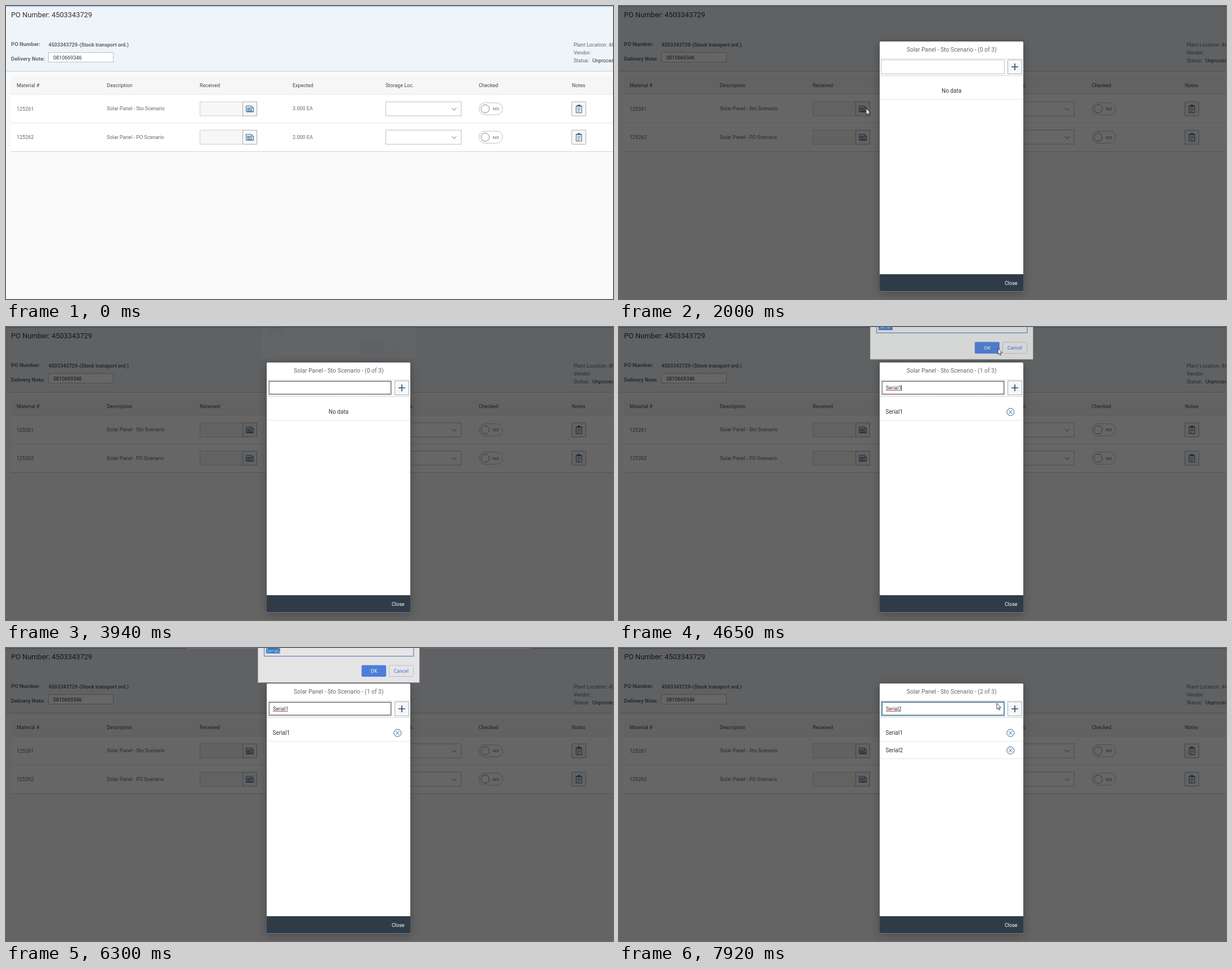
Recreate the animation shown at these times as an HTML page. Size 1078x520 px, loop 8 s.

```html
<!DOCTYPE html>
<html lang="en">
<head>
<meta charset="utf-8">
<title>Goods receipt</title>
<style>
  html, body { margin: 0; width: 100%; height: 100%; overflow: hidden; background: #fafafa; }
  svg { display: block; font: 9px Roboto, sans-serif; fill: #666; }
  .dark { fill: #333; }
  .bold { font-weight: 700; font-size: 9.5px; }
  .field { fill: #fff; stroke: #bfbfbf; }
  .off { fill: #f7f7f7; stroke: #cfcfcf; }
  .button { fill: #f7f7f7; stroke: #ababab; }
  .icon { fill: none; stroke: #346187; }
  .line { fill: none; stroke: #e5e5e5; }
  .pressed .button { fill: #427cac; stroke: #2a5f8c; }
  .pressed .icon { stroke: #fff; }
  .big { font-size: 10px; }
  #prompt text { font: 8.3px "Open Sans", sans-serif; }
</style>
</head>
<body>
<svg width="1078" height="520" viewBox="0 0 1078 520">
  <defs>
    <filter id="shadow" x="-30%" y="-20%" width="160%" height="140%">
      <feDropShadow dx="0" dy="3" stdDeviation="9" flood-opacity=".28"/>
    </filter>
  </defs>

  <rect width="1078" height="520" fill="#fafafa"/>
  <rect width="1078" height="115" fill="#eff4f9"/>
  <rect width="1078" height="1.5" fill="#a9cbec"/>
  <rect y="115" width="1078" height="1" fill="#cfd6dc"/>
  <rect y="116" width="1078" height="1" fill="#eceff1"/>
  <text class="dark" x="9" y="20" font-size="12.8">PO Number: 4503343729</text>
  <text class="bold" x="9" y="71.3">PO Number:</text>
  <text x="75.5" y="72.3" font-weight="700">4503343729-(Stock transport ord.)</text>
  <text class="bold" x="9" y="97.3">Delivery Note:</text>
  <rect class="field" x="75.5" y="82.5" width="115" height="17"/>
  <text class="dark" x="84" y="94.5">0810669346</text>
  <text x="1008" y="72">Plant Location: 46</text>
  <text x="1008" y="86">Vendor:</text>
  <text x="1008" y="99.5">Status:</text>
  <text class="dark" x="1041.5" y="100">Unprocessed</text>

  <rect x="9" y="126" width="1069" height="31" fill="#f6f6f6"/>
  <g id="headings" fill="#484848"></g>
  <g id="rows"></g>
  <path class="line" d="M9 156.5H1078"/>
  <path class="line" d="M9 207.5H1078"/>
  <path d="M9 258.5H1078" stroke="#d2d2d2"/>

  <g id="modal">
    <rect width="1078" height="520" opacity=".6" fill="#000"/>
    <rect x="463" y="63" width="255" height="443.5" rx="2" fill="#fff" filter="url(#shadow)"/>
    <path d="M463 476H718V504.5a2 2 0 0 1-2 2H465a2 2 0 0 1-2-2Z" fill="#2f3c48"/>
    <text x="685" y="495" fill="#fff">Close</text>
    <text id="title" x="590.7" y="81" font-size="10.35" text-anchor="middle"></text>
    <path class="line" d="M463 93.5H718M463 165.5H718"/>
    <path d="M463 123.5H718" stroke="#d5d5d5"/>
    <rect class="field" x="465.5" y="95.5" width="219" height="25"/>
    <g id="focus" fill="none">
      <rect x="467.5" y="96.5" width="216" height="22.5" stroke="#909090"/>
      <rect x="467.5" y="96.5" width="216" height="22.5" stroke="#333" stroke-dasharray="1"/>
    </g>
    <rect id="glow" x="465.8" y="95.3" width="218.6" height="25" fill="none" stroke="#6ea5d2" stroke-width="1.6"/>
    <g id="entry">
      <text id="entryText" class="dark" x="474" y="111"></text>
      <path d="M474 112.5H501" stroke="#c43c3c" stroke-width=".9"/>
    </g>
    <rect id="caret" y="103" width="1" height="10" fill="#222"/>
    <rect class="button" x="690.5" y="95.5" width="25" height="25"/>
    <path d="M697 108H709M703 102V114" stroke="#2d4f6e" stroke-width="1.7"/>
    <text id="empty" class="dark big" x="573" y="153.5">No data</text>
    <g id="list"></g>
  </g>

  <rect id="edge" width="612" height="1.4" fill="#d5d5d5"/>

  <g id="prompt">
    <rect x="446" y="-60" width="289.5" height="122.3" fill="#fff" stroke="#888" stroke-width=".7"/>
    <rect x="457.5" y="-10" width="267.5" height="25" fill="#fff" stroke="#7c9bd3" stroke-width="1.5"/>
    <rect x="461" y="-1" width="25" height="11" fill="#2374cf"/>
    <text id="promptText" x="461.5" y="8" fill="#fff"></text>
    <rect x="631.8" y="31" width="44" height="20.7" rx="2" fill="#4a84f0"/>
    <text x="653.8" y="44.5" fill="#fff" text-anchor="middle" style="font-weight:600">OK</text>
    <rect x="681.2" y="31.5" width="43.4" height="20" rx="2" fill="#fff" stroke="#ccd0d6"/>
    <text x="702.9" y="44.5" fill="#4a84f0" text-anchor="middle" style="font-weight:600">Cancel</text>
  </g>

  <path id="cursor" d="M0 0V10.6L2.4 8.4 4 12 5.6 11.3 4.1 7.8H7.3Z" fill="#fff" stroke="#111" stroke-width=".8"/>
</svg>

<script>
const LOOP = 8000;
const $ = id => document.getElementById(id);

$('headings').innerHTML = [
  [19, 'Material #'], [179, 'Description'], [344, 'Received'], [509, 'Expected'],
  [674, 'Storage Loc.'], [839.5, 'Checked'], [1005, 'Notes'],
].map(([x, label]) => `<text x="${x}" y="144">${label}</text>`).join('');

// Coordinates inside a row are relative to its vertical centre.
const tableRow = (number, name, amount, y) => `
  <g transform="translate(0 ${y})">
    <rect class="back" x="9" y="-25.5" width="1069" height="50.5" fill="#fff"/>
    <text x="19" y="3.5">${number}</text>
    <text x="179" y="2.7">${name}</text>
    <rect class="off" x="344.5" y="-12.5" width="76" height="25"/>
    <g class="scan">
      <rect class="button" x="420.5" y="-12.5" width="25" height="25"/>
      <path class="icon" d="M426.5 -5H436L439.5 -1.5V5.5H426.5ZM436 -5V-1.5H439.5"/>
      <path class="icon" d="M429 -2.5V2.5M431.3 -2.5V2.5M433.5 -2.5V2.5M436 -.5V2.5M428 4H438" stroke-width="1.3"/>
    </g>
    <text x="509" y="2.7">${amount}</text>
    <rect class="field" x="674.5" y="-12.5" width="134" height="25"/>
    <path d="M792 -1.5L796 2.5L800 -1.5" fill="none" stroke="#666"/>
    <rect class="field" x="840" y="-10.7" width="42" height="21.4" rx="10.7"/>
    <circle cx="851" r="7.3" fill="#fff" stroke="#858585"/>
    <text x="864.5" y="2.9" font-size="8">NO</text>
    <rect class="button" x="1004.8" y="-12.5" width="25" height="25" rx="1"/>
    <path class="icon" d="M1012.5 -5H1022.5V7H1012.5ZM1014.5 -1.5H1020.5M1014.5 1.5H1020.5M1014.5 4.5H1018.5"/>
    <path class="icon" d="M1013 -5H1022M1015.5 -6.5H1019.5" stroke-width="1.8"/>
  </g>`;
$('rows').innerHTML =
  tableRow(125261, 'Solar Panel - Sto Scenario', '3.000 EA', 182.5) +
  tableRow(125262, 'Solar Panel - PO Scenario', '2.000 EA', 232.8);

$('list').innerHTML = [1, 2].map(n => `
  <g transform="translate(0 ${31 * (n - 1)})">
    <text class="dark big" x="473.5" y="153.5">Serial${n}</text>
    <circle class="icon" cx="695.3" cy="150.7" r="6.5"/>
    <path class="icon" d="M692 147.4L698.6 154M698.6 147.4L692 154"/>
    <path class="line" d="M463 165.5H718"/>
  </g>`).join('');

const firstRow = $('rows').firstElementChild;
const firstScan = firstRow.querySelector('.scan');
const listItems = [...$('list').children];

// Each path is visible from its first time to its last: [ms, x, y].
const cursorPaths = [
  [[140, 879, 462], [300, 690, 340], [520, 420, 192], [700, 384, 178], [930, 408, 178], [990, 408, 178],
   [1390, 437, 183], [1990, 437, 183], [2000, 439, 182], [2230, 439, 182], [2400, 560, 16], [2460, 600, -20]],
  [[4230, 671, -15], [4480, 673, 38], [5270, 673, 38], [5420, 672, 22], [5500, 672, -15]],
  [[6500, 672, -15], [6950, 673, 40], [7530, 673, 40], [7900, 671, 98], [LOOP, 671, 98]],
];
const prompts = [
  { open: 3940, close: 4580, text: 'Serial1' },
  { open: 6210, close: 7160, text: 'Serial2' },
];
const caretTimes = [[2300, 2770], [3300, 3650], [4580, 5120], [5650, 6200], [7150, 7600]];

const clamp = v => Math.min(1, Math.max(0, v));
const within = (t, from, to) => t >= from && t < to;
const show = (el, on) => el.setAttribute('display', on ? 'inline' : 'none');
const move = (el, x, y) => el.setAttribute('transform', `translate(${x} ${y})`);

function drawCursor(t) {
  const path = cursorPaths.find(p => within(t, p[0][0], p.at(-1)[0]));
  show($('cursor'), path);
  if (!path) return;
  const i = path.findIndex(k => k[0] > t);
  const [t0, x0, y0] = path[i - 1], [t1, x1, y1] = path[i];
  const p = (t - t0) / (t1 - t0);
  move($('cursor'), x0 + (x1 - x0) * p, y0 + (y1 - y0) * p);
}

function drawPrompt(t) {
  const prompt = prompts.find(p => within(t, p.open, p.close + 140));
  show($('prompt'), prompt);
  if (!prompt) return;
  const opened = 1 - (1 - clamp((t - prompt.open) / 200)) ** 3;
  const closed = clamp((t - prompt.close) / 140);
  const scale = .95 + .05 * opened;
  $('promptText').textContent = prompt.text;
  $('prompt').setAttribute('opacity', opened * (1 - closed ** 2));
  $('prompt').setAttribute('transform',
    `translate(590.5 ${-40 - 9 * closed}) scale(${scale}) translate(-590.5 40)`);
}

function drawEdge(t) {
  const first = t < 5000;
  const strength = first
    ? .85 * clamp((t - 3100) / 200) * clamp((3650 - t) / 150)
    : .22 * clamp((t - 6210) / 50) * clamp((6500 - t) / 100);
  move($('edge'), first ? 313 : 320, 0);
  $('edge').setAttribute('opacity', strength);
}

function draw(t) {
  const count = t < 4580 ? 0 : t < 7150 ? 1 : 2;
  firstRow.querySelector('.back').setAttribute('fill', within(t, 1850, 2000) ? '#f0f0f0' : '#fff');
  firstScan.setAttribute('class', within(t, 1925, 2000) ? 'pressed' : '');

  show($('modal'), t >= 2000);
  $('title').textContent = `Solar Panel - Sto Scenario - (${count} of 3)`;
  show($('empty'), count === 0);
  listItems.forEach((item, i) => show(item, i < count));
  show($('focus'), t >= 2300);
  show($('glow'), t >= 7850);
  show($('entry'), count > 0);
  $('entryText').textContent = `Serial${count}`;
  show($('caret'), caretTimes.some(([from, to]) => within(t, from, to)));
  $('caret').setAttribute('x', count ? 501 : 474);

  drawEdge(t);
  drawPrompt(t);
  drawCursor(t);
}

const start = performance.now();
function tick() {
  draw((performance.now() - start) % LOOP);
  requestAnimationFrame(tick);
}
tick();
</script>
</body>
</html>
```
